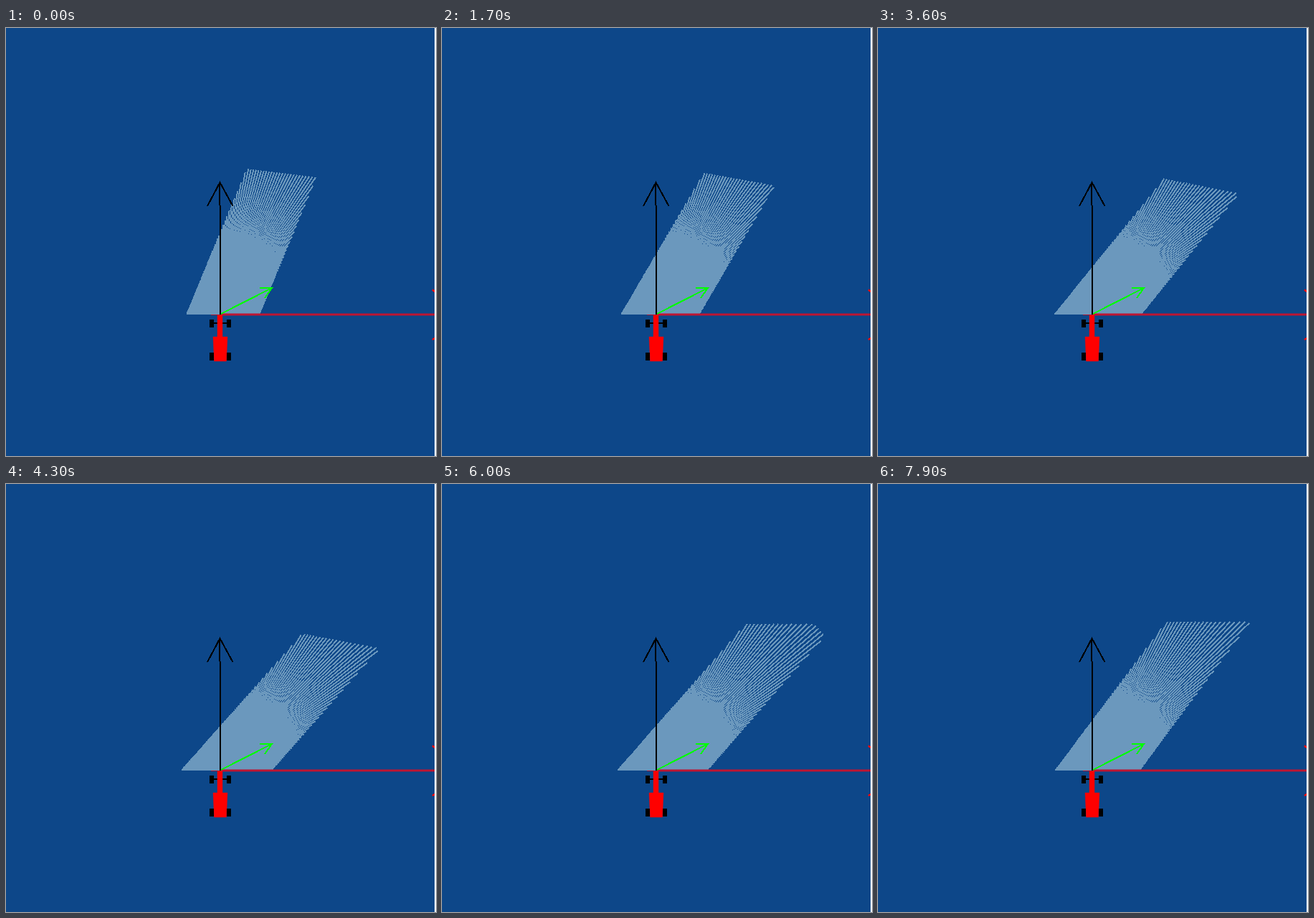
An HTML page that plays this animation: 600x596 px, repeating every 8000 ms.

```html
<!DOCTYPE html>
<html lang="en">
<head>
<meta charset="utf-8">
<title>Tractor sensor field</title>
<style>
  html, body { margin: 0; width: 100%; height: 100%; overflow: hidden; background: #0d4789; }
  svg { display: block; width: 600px; height: 596px; }
  .soft { shape-rendering: geometricPrecision; }
</style>
</head>
<body>
<svg viewBox="0 0 600 596" fill="none" shape-rendering="crispEdges">
  <rect width="600" height="596" fill="#0d4789"/>
  <path id="rays" stroke="#6b98bd" stroke-width="2"/>
  <path d="M286 399.5H299" stroke="#a51535"/>
  <path class="soft" d="M299 399H598" stroke="#be1532" stroke-width="3"/>
  <path class="soft" d="M595 364.5L599 367.5M595 434L599 431.5" stroke="#f00" stroke-width="2.5"/>
  <path d="M290 411H308" stroke="#000" stroke-width="2"/>
  <path class="soft" d="M295 400H302V430H309L307.5 464H290.5L289 430H295Z" fill="#f00" stroke="#f00" stroke-opacity=".4"/>
  <path d="M284 406h6v11h-6zM308 406h6v11h-6zM284 452h6v11h-6zM308 452h6v11h-6z" fill="#000"/>
  <path d="M299 399L298.4 215M281 248L298.5 215L316.5 248" stroke="#000" stroke-width="2"/>
  <path d="M300 398L371 362M354 362H371L361 376" stroke="#0f0" stroke-width="2"/>
  <rect x="598" width="2" height="596" fill="#f4f6f8"/>
</svg>
<script>
const LOOP = 8000, STEP = 100;
const ORIGIN = { x: 299, y: 398 };
const RANGE = 300, HALF_WIDTH = 47.35;
const RAD = Math.PI / 180;

const raysEl = document.getElementById('rays');
const mix = (a, b, k) => a + (b - a) * k;
const clamp = v => Math.max(0, Math.min(1, v));
const softMin = (a, b, k) => -k * Math.log(Math.exp(-a / k) + Math.exp(-b / k));

// The swath is a strip of constant width; it leans out, turns and swings slowly back.
function swathAt(s) {
  const leanDeg = softMin(22.6 + 4.6 * s, 55.8 - 2.4 * s, 2.7);
  const lean = leanDeg * RAD;
  const shift = 0.166 * leanDeg;
  const level = clamp((s - 3.6) / 1.8) ** 3;
  const topY = mix(202 + 5 * Math.min(s, 3.6), 196 - 1.6 * Math.max(0, s - 5.4), level);
  const slope = (0.205 - 0.08 * Math.exp(-s / 1.5)) * (1 - level);
  const height = ORIGIN.y - topY;
  const topOffset = shift / Math.cos(lean) + height * Math.tan(lean);
  return { lean, shift, slope, reach: height + slope * topOffset };
}

// Ray length until it meets a side, the far edge or the range limit.
function rayLength(angle, { lean, shift, slope, reach }) {
  const across = Math.sin(angle - lean);
  const side = (HALF_WIDTH + Math.sign(across) * shift) / Math.abs(across);
  const toward = Math.cos(angle) + slope * Math.sin(angle);
  const far = toward > 0 ? reach / toward : Infinity;
  return Math.min(RANGE, side, far);
}

function draw(ms) {
  const swath = swathAt(ms / 1000);
  let d = '';
  for (let deg = -90; deg <= 90; deg++) {
    const angle = deg * RAD, r = rayLength(angle, swath);
    const x = ORIGIN.x + r * Math.sin(angle), y = ORIGIN.y - r * Math.cos(angle);
    d += `M${ORIGIN.x} ${ORIGIN.y}L${x.toFixed(2)} ${y.toFixed(2)}`;
  }
  raysEl.setAttribute('d', d);
}

let start, shown;
function tick(now) {
  start ??= now;
  const t = Math.floor((now - start) % LOOP / STEP) * STEP;
  if (t !== shown) draw(shown = t);
  requestAnimationFrame(tick);
}
draw(0);
requestAnimationFrame(tick);
</script>
</body>
</html>
```
